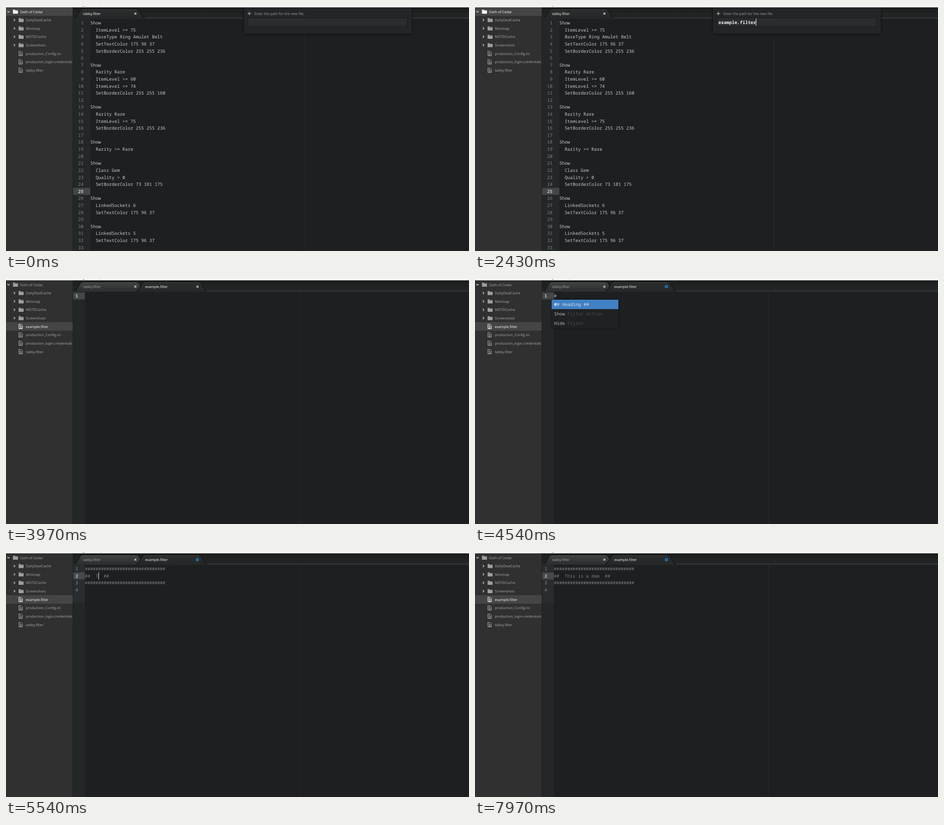
Recreate the animation shown at these times as an HTML page with a canvas. Size 1027 by 545 pixels, loop 8000 ms.

```html
<!DOCTYPE html>
<html lang="en">
<head>
<meta charset="utf-8">
<title>Editor demo</title>
<style>
  html, body { margin: 0; width: 100%; height: 100%; overflow: hidden; background: #1d1f21; }
  canvas { display: block; }
</style>
</head>
<body>
<canvas id="stage" width="1027" height="545"></canvas>
<script>
const ctx = document.getElementById('stage').getContext('2d');
ctx.textRendering = 'geometricPrecision';

const W = 1027, H = 545, LOOP = 8000;
const UI = '7.8px "Open Sans", "Noto Sans", sans-serif';
const MONO = '9.92px "Noto Sans Mono", "DejaVu Sans Mono", monospace';
const CH = 5.952, LINE = 15.61, TOP = 37.6, ROW = 18.62;

const OLD_FILE = 'tabby.filter', NEW_FILE = 'example.filter';
const HEADING = 'This is a dem', HINT = 'Type your heading here';
const RULE = '#'.repeat(30);

// Moments at which one more character appears
const NAME_KEYS = [130, 440, 740, 900, 1170, 1310, 1450, 1600, 1750, 1880, 2010, 2150, 2300, 2430];
const HEAD_KEYS = [5540, 5680, 5830, 5830, 5980, 6250, 6400, 6550, 6700, 6840, 7090, 7240, 7520];
const OPENED = 2730, FOCUSED = 2850, HASH = 4110, MODIFIED = 4390, EXPANDED = 4820;

const CODE = `Show
  ItemLevel >= 75
  BaseType Ring Amulet Belt
  SetTextColor 175 96 37
  SetBorderColor 255 255 236

Show
  Rarity Rare
  ItemLevel >= 60
  ItemLevel <= 74
  SetBorderColor 255 255 160

Show
  Rarity Rare
  ItemLevel >= 75
  SetBorderColor 255 255 236

Show
  Rarity >= Rare

Show
  Class Gem
  Quality > 0
  SetBorderColor 73 181 175

Show
  LinkedSockets 6
  SetTextColor 175 96 37

Show
  LinkedSockets 5
  SetTextColor 175 96 37
`.split('\n');

const typed = (text, keys, t) => text.slice(0, keys.filter(k => k <= t).length);
const lineY = n => TOP + (n - 1) * LINE;

function box(x, y, w, h, color) {
  ctx.fillStyle = color;
  ctx.fillRect(x, y, w, h);
}

function write(text, x, y, color, font) {
  ctx.font = font;
  ctx.fillStyle = color;
  ctx.fillText(text, x, y);
}

const label = (text, x, y, color) => write(text, x, y + 3, color, UI);
const mono = (text, x, y, color, weight = '') => write(text, x, y + 3.5, color, weight + ' ' + MONO);
const caret = (x, y) => box(Math.floor(x), Math.round(y - 8), 1, 16, '#ffffff');

function stroke(points, color, width) {
  ctx.strokeStyle = color;
  ctx.lineWidth = width;
  ctx.beginPath();
  points.forEach(([x, y]) => ctx.lineTo(x, y));
  ctx.stroke();
}

function chevron(x, y, open) {
  const pts = open ? [[-2.5, -1.2], [0, 1.3], [2.5, -1.2]] : [[-1.2, -2.5], [1.3, 0], [-1.2, 2.5]];
  stroke(pts.map(([a, b]) => [x + a, y + b]), '#c4c4c4', 1.5);
}

function folder(x, y, color) {
  box(x, y - 4.5, 5, 2, color);
  box(x, y - 3, 11, 7.5, color);
  box(x + 1, y - 2.9, 9, 0.6, '#555555');
}

function fileIcon(x, y, color) {
  const l = x + 0.5, r = x + 8.5, t = y - 5, b = y + 5;
  stroke([[l, t], [r - 3, t], [r, t + 3], [r, b], [l, b], [l, t - 0.5]], color, 1);
  for (let i = 0; i < 4; i++) box(x + 2, y - 2.6 + i * 2, i ? 5 : 3, 0.9, color);
}

function sidebar(opened) {
  box(0, 3, 148, H - 3, '#303030');
  box(148, 3, 1, H - 3, '#191a1b');
  const selected = opened ? 5 : 0;
  const files = ['production_Config.ini', 'production_login.credentials', OLD_FILE];
  if (opened) files.unshift(NEW_FILE);
  const rows = ['Oath of Cedar', 'DailyDealCache', 'Minimap', 'MOTDCache', 'Screenshots', ...files];
  rows.forEach((name, i) => {
    const y = 12.6 + i * ROW, on = i === selected;
    const color = on ? '#ffffff' : '#a9a9a9';
    if (on) box(0, Math.max(3, Math.round(y - 9.5)), 148, 19, '#454545');
    if (i < 5) {
      chevron(i ? 18.5 : 5.5, y, !i);
      folder(i ? 28 : 15.5, y, on ? '#ffffff' : '#a0a0a0');
    } else {
      fileIcon(28, y, color);
    }
    label(name, i ? 44 : 31, y, color);
  });
}

function tab(x, name, active, lit, dirty) {
  const fill = ctx.createLinearGradient(0, 6, 0, 27);
  fill.addColorStop(0, active ? '#2b2e2d' : '#414443');
  fill.addColorStop(1, active ? '#252829' : '#2b2e2e');
  ctx.beginPath();
  ctx.moveTo(x - 3, 26.5);
  ctx.quadraticCurveTo(x + 1, 26, x + 3, 23);
  ctx.lineTo(x + 11, 9);
  ctx.quadraticCurveTo(x + 12.5, 6.5, x + 16, 6.5);
  ctx.lineTo(x + 135, 6.5);
  ctx.quadraticCurveTo(x + 139, 6.5, x + 141, 9);
  ctx.lineTo(x + 149, 23);
  ctx.quadraticCurveTo(x + 151, 26, x + 154, 26.5);
  ctx.fillStyle = fill;
  ctx.fill();
  ctx.strokeStyle = '#111313';
  ctx.lineWidth = 1.4;
  ctx.stroke();
  box(x + 15, 7, 121, 0.7, active ? '#454948' : '#505352');
  if (active) box(x, 26, 151, 2, '#252829');
  label(name, x + 17, 16.6, lit ? '#ffffff' : '#a4a6a6');
  if (dirty) {
    ctx.strokeStyle = '#1c93ea';
    ctx.lineWidth = 1.7;
    ctx.beginPath();
    ctx.arc(x + 133 - 0.2, 16.9, 2.4, 0, Math.PI * 2);
    ctx.stroke();
  } else {
    const cx = x + 133, cy = 17;
    stroke([[cx - 2.2, cy - 2.2], [cx + 2.2, cy + 2.2]], '#c9cbcb', 1.5);
    stroke([[cx - 2.2, cy + 2.2], [cx + 2.2, cy - 2.2]], '#c9cbcb', 1.5);
  }
}

function tabBar(t) {
  const opened = t >= OPENED, focused = t >= FOCUSED;
  const back = ctx.createLinearGradient(0, 3, 0, 26);
  back.addColorStop(0, '#1c1e1e');
  back.addColorStop(1, '#232626');
  box(149, 3, W - 149, 23, back);
  box(149, 26, W - 149, 1, '#434646');
  box(149, 27, W - 149, 2, '#242728');
  tab(154, OLD_FILE, !opened, !focused, false);
  if (opened) tab(291.7, NEW_FILE, true, focused, t >= MODIFIED);
}

function gutter(width, active, count, right) {
  box(149, 29, width, H - 29, '#242728');
  box(149, lineY(active) - 7.8, width, LINE, '#434748');
  for (let n = 1; n <= count; n++) {
    const s = String(n), on = n === active;
    mono(s, right - s.length * CH, lineY(n), on ? '#c8cacb' : '#7f8385', on ? '600' : '');
  }
}

function dialog(t) {
  ctx.save();
  ctx.shadowColor = 'rgba(0,0,0,.55)';
  ctx.shadowBlur = 6;
  box(527, 3, 373, 59, '#232526');
  ctx.restore();
  ctx.strokeStyle = '#18191a';
  ctx.lineWidth = 1;
  ctx.strokeRect(527.5, 2.5, 373, 59);
  box(536, 16, 7.5, 1.5, '#a9abab');
  box(539, 13, 1.5, 7.5, '#a9abab');
  label('Enter the path for the new file.', 551, 16.8, '#a0a2a2');
  box(536, 26, 355, 20, '#2a2c2d');
  ctx.strokeStyle = '#17191a';
  ctx.strokeRect(536.5, 26.5, 354, 19);
  const name = typed(NAME_KEYS.length ? NEW_FILE : '', NAME_KEYS, t);
  if (name) {
    mono(name, 540, 36, '#f0f0f0', 'bold');
    caret(540 + name.length * CH + 0.6, 36);
  }
}

function oldFile(t) {
  box(663, 29, 1, H - 29, '#2a2c2e');
  gutter(38, 25, 33, 172);
  CODE.forEach((text, i) => mono(text, 187, lineY(i + 1), '#c8cac8'));
  dialog(t);
}

function suggestions() {
  ctx.save();
  ctx.shadowColor = 'rgba(0,0,0,.5)';
  ctx.shadowBlur = 4;
  box(169.5, 46, 149, 63, '#1f2123');
  ctx.restore();
  box(170, 46, 148, 21, '#4080c3');
  mono('#', 175.6, 56.5, '#ffffff', 'bold');
  mono('# Heading ##', 175.6 + CH, 56.5, '#d3e0ee');
  [['Show', 'Filter Action'], ['Hide', 'Filter']].forEach(([word, note], i) => {
    const y = 77.2 + i * 20.8;
    mono(word, 175.6, y, '#b4b6b7');
    mono(note, 175.6 + 5 * CH, y, '#484b4d');
  });
}

function newFile(t) {
  const x = 175;
  box(651, 29, 1, H - 29, '#2a2c2e');
  if (t < EXPANDED) {
    gutter(26, 1, 1, 160);
    if (t < HASH) {
      // Blink: off, on, off
      if (t < 3110 || (t >= 3540 && t < 3970)) caret(x, lineY(1));
      return;
    }
    mono('#', x, lineY(1), '#b9bbbb');
    if (t < 4540) caret(x + CH + 0.4, lineY(1));
    suggestions();
    return;
  }
  gutter(26, 2, 0, 160);
  box(149, 29, 26, 84, '#292d2f');
  box(149, lineY(2) - 7.8, 26, LINE, '#45494b');
  for (let n = 1; n <= 4; n++) mono(String(n), 160 - CH, lineY(n), n === 2 ? '#c8cacb' : '#898d8f', n === 2 ? '600' : '');
  const gray = '#7b7e7c', y = lineY(2);
  const text = typed(HEADING, HEAD_KEYS, t);
  if (!text) box(x + 4 * CH, y - 7.8, HINT.length * CH, LINE, '#3c3f42');
  mono(RULE, x, lineY(1), gray);
  mono('##  ' + (text || HINT) + '  ##', x, y, gray);
  mono(RULE, x, lineY(3), gray);
  if (text && t < 7970) caret(x + (4 + text.length) * CH + 0.4, y);
}

function menuStrip() {
  box(0, 0, W, 3, '#eef3f1');
  box(170, 0, 4, 1, '#777777');
  box(209, 0, 1, 1, '#777777');
}

function draw(t) {
  box(0, 0, W, H, '#1d1f21');
  tabBar(t);
  sidebar(t >= OPENED);
  (t < OPENED ? oldFile : newFile)(t);
  menuStrip();
}

const start = performance.now();
function tick() {
  draw((performance.now() - start) % LOOP);
  requestAnimationFrame(tick);
}
tick();
</script>
</body>
</html>
```
